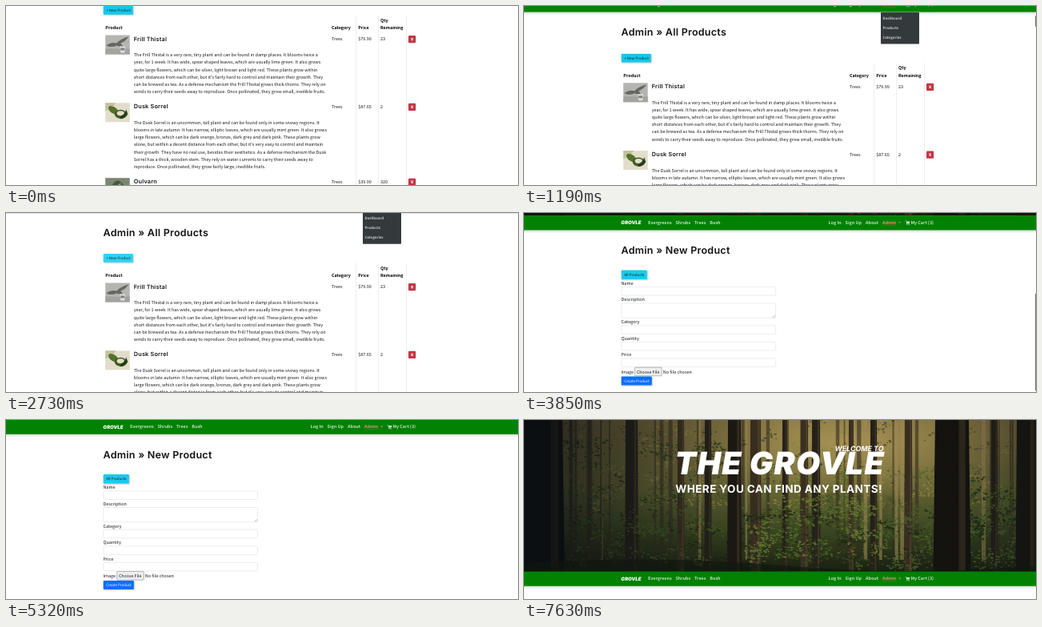
These frames come from a looping animation (640 by 224 pixels, 7.7 s). An HTML page:

```html
<!DOCTYPE html>
<html lang="en">
<head>
<meta charset="utf-8">
<title>Plant shop admin</title>
<style>
html, body { margin: 0; width: 100%; height: 100%; overflow: hidden; background: #fff; }
svg { display: block; width: 100vw; height: 100vh; }
text {
  font-family: "Noto Sans CJK JP", "Noto Sans CJK SC", "Noto Sans CJK", "Noto Sans", sans-serif;
  fill: #16191c; white-space: pre; text-rendering: geometricPrecision;
}
.head { font-family: Inter, "Open Sans", sans-serif; font-weight: 600; fill: #111; }
.hero { font-family: Inter, "Open Sans", sans-serif; fill: #fff; }
.bold { font-weight: 700; fill: #000; }
.nav { font-weight: 700; fill: #c6dfc6; }
.menu { font-weight: 700; fill: #c9cccf; }
.field { fill: #fff; stroke: #dcdfe2; stroke-width: .6; }
</style>
</head>
<body>
<svg id="stage" viewBox="0 0 640 224" preserveAspectRatio="none">
  <defs>
    <linearGradient id="sky" x2="0" y2="1">
      <stop offset="0" stop-color="#77693c"/>
      <stop offset=".45" stop-color="#6a6836"/>
      <stop offset=".75" stop-color="#37441f"/>
      <stop offset="1" stop-color="#191f12"/>
    </linearGradient>
    <radialGradient id="glow" cx=".64" cy=".15" r=".36">
      <stop offset="0" stop-color="#c9ad62" stop-opacity=".65"/>
      <stop offset="1" stop-color="#c9ad62" stop-opacity="0"/>
    </radialGradient>
    <linearGradient id="vignette">
      <stop offset="0" stop-color="#0c0f12" stop-opacity=".8"/>
      <stop offset=".32" stop-color="#0c0f12" stop-opacity=".2"/>
      <stop offset=".5" stop-color="#0c0f12" stop-opacity="0"/>
      <stop offset=".8" stop-color="#0c0f12" stop-opacity=".05"/>
      <stop offset="1" stop-color="#0c0f12" stop-opacity=".4"/>
    </linearGradient>
    <linearGradient id="shade" x2="0" y2="1">
      <stop offset="0" stop-color="#000" stop-opacity=".18"/>
      <stop offset="1" stop-color="#000" stop-opacity="0"/>
    </linearGradient>
    <clipPath id="heroBox"><rect width="640" height="190"/></clipPath>
  </defs>
  <rect width="640" height="224" fill="#fff"/>
  <g id="page">
    <g id="hero" clip-path="url(#heroBox)"></g>
    <g id="products"></g>
    <g id="form"></g>
    <g id="nav"></g>
    <g id="menu"></g>
  </g>
  <rect id="thumb" x="639" width="1" fill="#6f6f6f"/>
</svg>
<script>
const LOOP = 7700, STEP = 70, BODY = 5.47;
const $ = id => document.getElementById(id);

const rect = (x, y, w, h, fill, more = "") =>
  `<rect x="${x}" y="${y}" width="${w}" height="${h}" fill="${fill}" ${more}/>`;
const text = (x, y, str, size = BODY, cls = "", more = "") =>
  `<text x="${x}" y="${y}" font-size="${size}" class="${cls}" ${more}>${str}</text>`;
const path = (d, fill, more = "") => `<path d="${d}" fill="${fill}" ${more}/>`;

function random(seed) {
  return () => (seed = (seed * 16807) % 2147483647) / 2147483647;
}

// Forest banner: clumps of small leaves between trunks
function leaves(rnd, clumps, x0, x1, y0, y1, color) {
  const spread = r => (rnd() + rnd() + rnd() - 1.5) * r;
  let d = "";
  for (let i = 0; i < clumps; i++) {
    const cx = x0 + (x1 - x0) * rnd(), cy = y0 + (y1 - y0) * rnd();
    for (let n = 0; n < 14; n++) {
      const w = 1 + 1.8 * rnd(), h = .5 + rnd(), tilt = spread(1.4);
      const x = cx + spread(15), y = cy + spread(7);
      d += `M${(x - w).toFixed(1)} ${y.toFixed(1)}l${w.toFixed(1)} ${(-h).toFixed(1)} ${w.toFixed(1)} ${(h + tilt).toFixed(1)} ${(-w).toFixed(1)} ${h.toFixed(1)}z`;
    }
  }
  return path(d, color, 'opacity=".85"');
}

function trunk(x, w, color) {
  return path(`M${x} 0h${w}l${w * .06} 190h${-w * 1.12}z`, color) +
    path(`M${x + w * .7} 0h${w * .2}v190h${-w * .2}z`, "#a08454", 'opacity=".2"');
}

function forest() {
  const rnd = random(71);
  let out = rect(0, 0, 640, 190, "url(#sky)") + rect(0, 0, 640, 190, "url(#glow)");
  out += leaves(rnd, 60, 50, 640, 0, 110, "#8f8744") + leaves(rnd, 50, 50, 640, 0, 110, "#4a4d28");
  for (let i = 0; i < 40; i++) {
    const x = 45 + 590 * rnd();
    out += rect(x.toFixed(1), 0, (1.5 + 4 * rnd()).toFixed(1), 175,
      rnd() < .3 ? "#a38c57" : "#352e20", 'opacity=".6"');
  }
  out += leaves(rnd, 65, 50, 640, 60, 185, "#55682a") + leaves(rnd, 50, 50, 270, 20, 185, "#2b3d1b");
  const mid = [[127, 15], [192, 8], [226, 8], [283, 13], [323, 6], [346, 9], [360, 10],
    [406, 6], [433, 8], [476, 9], [584, 8]];
  mid.forEach(([x, w], i) => out += trunk(x, w, i % 2 ? "#3a2f20" : "#26211a"));
  out += leaves(rnd, 60, 50, 640, 115, 188, "#1c2916") +
    leaves(rnd, 34, 55, 250, 85, 180, "#445c27") +
    leaves(rnd, 45, 285, 445, 95, 175, "#66792f") +
    leaves(rnd, 24, 285, 445, 95, 180, "#34491e") +
    leaves(rnd, 24, 440, 520, 105, 185, "#485c28") +
    leaves(rnd, 40, 555, 640, 75, 180, "#4f682a") +
    leaves(rnd, 24, 555, 640, 75, 185, "#20301a");
  out += trunk(0, 48, "#0b0d0f") + trunk(255, 16, "#1d1913") +
    trunk(514, 42, "#14130f") + trunk(616, 24, "#191712");
  out += rect(0, 0, 640, 190, "url(#vignette)");
  out += path("M0 180Q160 168 320 182T640 182V190H0Z", "#12160f", 'opacity=".65"');
  return out +
    text(449.6, 38.6, "WELCOME TO", 8.9, "hero", 'font-weight="700" font-style="italic" text-anchor="end"') +
    text(319.8, 68, "THE GROVLE", 39, "hero",
      'font-weight="900" font-style="italic" letter-spacing="1.3" text-anchor="middle"') +
    text(318.6, 90.7, "WHERE YOU CAN FIND ANY PLANTS!", 13.5, "hero",
      'font-weight="700" letter-spacing=".42" text-anchor="middle"');
}

function navBar() {
  const links = [[155, "Evergreens"], [189.5, "Shrubs"], [213, "Trees"], [232.3, "Bush"],
    [380.6, "Log In"], [401.6, "Sign Up"], [427, "About"], [483.4, "My Cart (3)"]];
  return rect(0, 207.5, 640, 4, "url(#shade)") +
    rect(0, 189.6, 640, 18.2, "#028102") +
    text(121.3, 200.6, "GROVLE", 6.1, "hero", 'font-weight="900" font-style="italic"') +
    links.map(([x, s]) => text(x, 200.4, s, 5.4, "nav")).join("") +
    text(448, 200.4, "Admin", 5.4, "nav", 'style="fill:#cf9a82"') +
    rect(448, 201.2, 17.5, .6, "#c8463c") +
    path("M468.2 197.6h3l-1.5 1.6z", "#cf9a82") +
    path("M476.6 196h1.2l.4 1h4.2l-.6 2.4h-3.1l.2.6h2.8v.5h-3.3l-1-4h-.8z", "#c6dfc6") +
    '<g fill="#c6dfc6"><circle cx="479" cy="201" r=".6"/><circle cx="481.3" cy="201" r=".6"/></g>';
}

function menu() {
  return rect(446, 208.2, 48, 39.5, "#343a3c", 'rx="1"') +
    ["Dashboard", "Products", "Categories"].map((s, i) =>
      text(448.4, 217.3 + i * 12, s, 4.45, "menu")).join("");
}

const heading = s => text(121.5, 237.6, s, 12.5, "head", 'letter-spacing=".27"');

const button = (y, w, h, label, fill, ink, id = "") =>
  rect(122, y + .6, w + .9, h + .9, "#000", 'rx="1.2" opacity=".14"') +
  rect(121.6, y, w, h, fill, `rx="1.2" ${id && `id="${id}"`}`) +
  text(125.3, y + h / 2 + 1.7, label, 4.5, "", `style="fill:${ink}"`);

// Product table
const items = [
  ["Frill Thistal", "$79.99", "23", [
    "The Frill Thistal is a very rare, tiny plant and can be found in damp places. It blooms twice a",
    "year, for 1 week. It has wide, spear shaped leaves, which are usually lime green. It also grows",
    "quite large flowers, which can be silver, light brown and light red. These plants grow within",
    "short distances from each other, but it's fairly hard to control and maintain their growth. They",
    "can be brewed as tea. As a defense mechanism the Frill Thistal grows thick thorns. They rely on",
    "winds to carry their seeds away to reproduce. Once pollinated, they grow small, inedible fruits."]],
  ["Dusk Sorrel", "$87.65", "2", [
    "The Dusk Sorrel is an uncommon, tall plant and can be found only in some snowy regions. It",
    "blooms in late autumn. It has narrow, elliptic leaves, which are usually mint green. It also grows",
    "large flowers, which can be dark orange, bronze, dark grey and dark pink. These plants grow",
    "alone, but within a decent distance from each other, but it's very easy to control and maintain",
    "their growth. They have no real use, besides their aesthetics. As a defense mechanism the Dusk",
    "Sorrel has a thick, wooden stem. They rely on water currents to carry their seeds away to",
    "reproduce. Once pollinated, they grow fairly large, inedible fruits."]],
  ["Oulvarn", "$39.99", "320", []]
];

const photos = [
  rect(0, 0, 30.5, 24, "#b4b4b1") + rect(0, 17, 30.5, 7, "#a3a3a0") +
    path("M1 13Q7 8 14 10Q20 4 29 2Q25 8 19 10L22 14H17L14 13Q8 16 1 13Z", "#666763") +
    path("M18 14h7l-1 8h-5z", "#dededb") + path("M19 16h5v3h-5z", "#80807c"),
  rect(0, 0, 30.5, 24, "#e2ddcb") + path("M0 0h13l-5 7-8 3z", "#c3c29f") +
    '<ellipse cx="10" cy="9" rx="7" ry="4" fill="#55702c" transform="rotate(35 10 9)"/>' +
    '<ellipse cx="19" cy="14" rx="7.5" ry="5.5" fill="#3f5a22"/>' +
    '<ellipse cx="19" cy="13" rx="4.6" ry="3" fill="#dfe0c4"/>' +
    path("M20 16q5-2 6-8l2 6q-3 6-10 6z", "#263c18"),
  rect(0, 0, 30.5, 24, "#7c8771") + path("M3 24Q6 6 15 3Q26 6 28 24Z", "#46583a") +
    path("M10 24Q12 9 20 6Q16 13 17 24Z", "#a5ae93")
];

const bin = '<path d="M-1.5-1.6h3v.6h-3zM-1.2-.7h2.4l-.3 2.5h-1.8z" fill="#f3dcdf"/>';

function productPage() {
  let out = heading("Admin » All Products") +
    button(260, 37.2, 10.8, "+ New Product", "#17c7ea", "#10242b", "add");
  for (const x of [437.3, 465.3, 500.4]) out += rect(x, 271.5, .6, 260, "#e1e4e7");
  for (const [x, y, s] of [[124.3, 289, "Product"], [407, 289, "Category"], [440.2, 289, "Price"],
    [468, 279.6, "Qty"], [468, 289, "Remaining"]]) out += text(x, y, s, 5.4, "bold");

  let y = 301;
  items.forEach(([name, price, qty, lines], i) => {
    out += `<g transform="translate(124.2 ${y - 4.5})">${photos[i]}</g>` +
      text(159.8, y + 2.6, name, 7.2, "head", 'letter-spacing=".25"') +
      text(407, y + 2.1, "Trees") + text(440.2, y + 2.1, price) + text(468, y + 2.1, qty) +
      rect(503, y - 4, 9.2, 9.3, "#c53646", 'rx="1.2"') +
      `<g transform="translate(507.6 ${y + .5})">${bin}</g>`;
    lines.forEach((s, n) => out += text(159.8, y + 22.3 + n * 9.1, s));
    y += 30.2 + 9.1 * lines.length;
  });
  return out;
}

// New product form
function formPage() {
  let out = heading("Admin » New Product") +
    button(258, 32.2, 11.4, "All Products", "#1fc8ec", "#10242b");
  const fields = [["Name", 276.3, 10.6], ["Description", 296.8, 18.2], ["Category", 324.6, 10.6],
    ["Quantity", 345.2, 10.6], ["Price", 365.7, 10.6]];
  for (const [label, y, h] of fields)
    out += text(121.4, y, label, 5.5) + rect(121.8, y + 2.6, 192.8, h, "#fff", 'rx="1" class="field"');
  return out +
    path("M310.8 317.2l3-3M312.6 317.2l1.2-1.2", "none", 'stroke="#888" stroke-width=".5"') +
    text(121.4, 387.1, "Image", 5.4) +
    rect(138.6, 379.6, 33.6, 10.6, "#efefef", 'rx=".8" stroke="#8a8a8a" stroke-width=".6"') +
    text(140.9, 387.1, "Choose File", 5.3, "", 'font-weight="500"') +
    text(173.8, 387.1, "No file chosen", 5.5) +
    button(391, 38.2, 11, "Create Product", "#0d6efd", "#fff");
}

$("hero").innerHTML = forest();
$("nav").innerHTML = navBar();
$("menu").innerHTML = menu();
$("products").innerHTML = productPage();
$("form").innerHTML = formPage();

const clamp = v => Math.min(1, Math.max(0, v));
const span = (t, a, b) => clamp((t - a) / (b - a));

function listScroll(t) {
  if (t < 820) return 260 - 67 * (1 - (1 - span(t, 280, 820)) ** 2);
  const p = span(t, 820, 1610);
  return 193 + 16 * p * p * (3 - 2 * p);
}

const formScroll = t =>
  t < 3640 || t >= 5810 ? 0 : 190 * (1 - Math.exp((3640 - t) / 53));

function draw(t) {
  const list = t < 3080;
  const y = list ? listScroll(t) : formScroll(t);
  const height = list ? 3700 : 414;
  const seen = list
    ? (t >= 350) * (1 - span(t, 2030, 2240))
    : (t >= 3710 && t < 5810) * (1 - span(t, 4900, 5110));

  $("page").setAttribute("transform", `translate(0 ${-y.toFixed(2)})`);
  $("products").style.display = $("menu").style.display = list ? "" : "none";
  $("form").style.display = list ? "none" : "";
  $("add").setAttribute("fill", t >= 2730 ? "#31d2f2" : "#17c7ea");
  $("add").setAttribute("stroke", t >= 2800 ? "#86e3f6" : "none");

  const thumb = $("thumb");
  thumb.setAttribute("y", y / height * 224);
  thumb.setAttribute("height", Math.max(12, 224 * 224 / height));
  thumb.setAttribute("opacity", seen);
}

const start = performance.now();
function tick() {
  const t = (performance.now() - start) % LOOP;
  draw(Math.floor(t / STEP) * STEP);
  requestAnimationFrame(tick);
}
tick();
</script>
</body>
</html>
```
